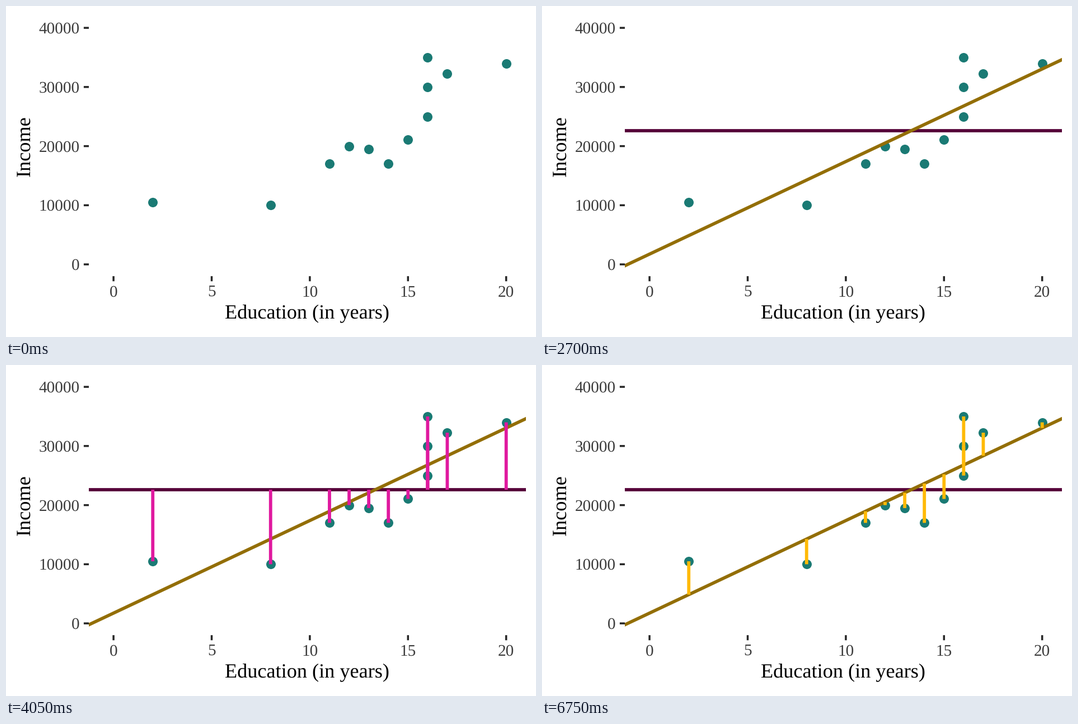
Recreate the animation shown at these times as a matplotlib script. Size 947 by 592 pixels, loop 8000 ms.

```python
import numpy as np
import matplotlib.pyplot as plt
from matplotlib.animation import FuncAnimation
from matplotlib.patches import Rectangle

W, H, DPI = 947, 592, 64
STEP_MS, LOOP_MS, PHASE_MS = 50, 8000, 1350
LEFT, RIGHT, TOP, BOTTOM = 148, 929, 17.9, 483.2

TEAL, MAROON, BRONZE = "#1a7a74", "#560339", "#936e06"
PINK, YELLOW, PURPLE = "#e0199f", "#ffba08", "#6030b2"
TICK, TICK_TEXT = "#262626", "#3c3c3c"

plt.rcParams["text.hinting"] = "none"

years = np.array([2, 8, 11, 12, 13, 14, 15, 16, 16, 16, 17, 20])
income = np.array([10500, 10000, 17000, 20000, 19500, 17000,
                   21050, 25000, 30000, 35000, 32250, 34000])
mean = income.mean()
slope, base = np.polyfit(years, income, 1)


def pt(px):
    return px * 72 / DPI


def sx(year):
    return 192.1 + 35.08 * year


def sy(value):
    return 462.1 - 0.010575 * value


fig = plt.figure(figsize=(W / DPI, H / DPI), dpi=DPI, facecolor="white")
ax = fig.add_axes([0, 0, 1, 1])
ax.set_xlim(0, W)
ax.set_ylim(H, 0)
ax.axis("off")
panel = Rectangle((LEFT, TOP), RIGHT - LEFT, BOTTOM - TOP,
                  transform=ax.transData)


def line(xs, ys, color, width=5.8):
    artist, = ax.plot(xs, ys, color=color, lw=pt(width),
                      solid_capstyle="butt", snap=False)
    return artist


def label(x, y, text, size, color="black", font="Liberation Serif", **kw):
    kw = {"ha": "center", "va": "baseline", "rotation_mode": "anchor", **kw}
    return ax.text(x, y, text, fontsize=pt(size), color=color,
                   family=font, **kw)


def residuals(ends, color):
    return [line([sx(a)] * 2, [sy(b), sy(e)], color)
            for a, b, e in zip(years, income, ends)]


# Axes
for v in range(0, 50000, 10000):
    line([LEFT - 9.1, LEFT], [sy(v)] * 2, TICK, 3.5)
    label(131.7, sy(v) + 9.8, str(v), 29.2, TICK_TEXT, ha="right")
for v in range(0, 25, 5):
    line([sx(v)] * 2, [BOTTOM, BOTTOM + 9.1], TICK, 3.5)
    label(sx(v), 519.3, str(v), 29.2, TICK_TEXT)
label(538, 559.3, "Education (in years)", 36.25)
label(42, 250.2, "Income", 36.25, rotation=90)

# Data and fits
ax.scatter(sx(years), sy(income), s=pt(17) ** 2, color=TEAL, linewidths=0,
           snap=False)
mean_line = line([LEFT, RIGHT], [sy(mean)] * 2, MAROON)
ends = np.array([-2, 22])
fit_line = line(sx(ends), sy(base + slope * ends), BRONZE)
fit_line.set_clip_path(panel)

mean_gaps = residuals(np.full(len(years), mean), PINK)
versus = label(437, 171, "versus", 70.5, PURPLE, "Liberation Sans")
fit_gaps = residuals(base + slope * years, YELLOW)
for artist in [mean_line, *mean_gaps, *fit_gaps]:
    artist.set_zorder(2)
fit_line.set_zorder(2)


def update(i):
    phase = i * STEP_MS // PHASE_MS
    mean_line.set_visible(phase >= 1)
    fit_line.set_visible(phase >= 2)
    versus.set_visible(phase == 4)
    for gap in mean_gaps:
        gap.set_visible(phase == 3)
    for gap in fit_gaps:
        gap.set_visible(phase == 5)
    return []


anim = FuncAnimation(fig, update, frames=LOOP_MS // STEP_MS,
                     interval=STEP_MS, repeat=True, repeat_delay=0,
                     init_func=lambda: update(0))
plt.show()
```
